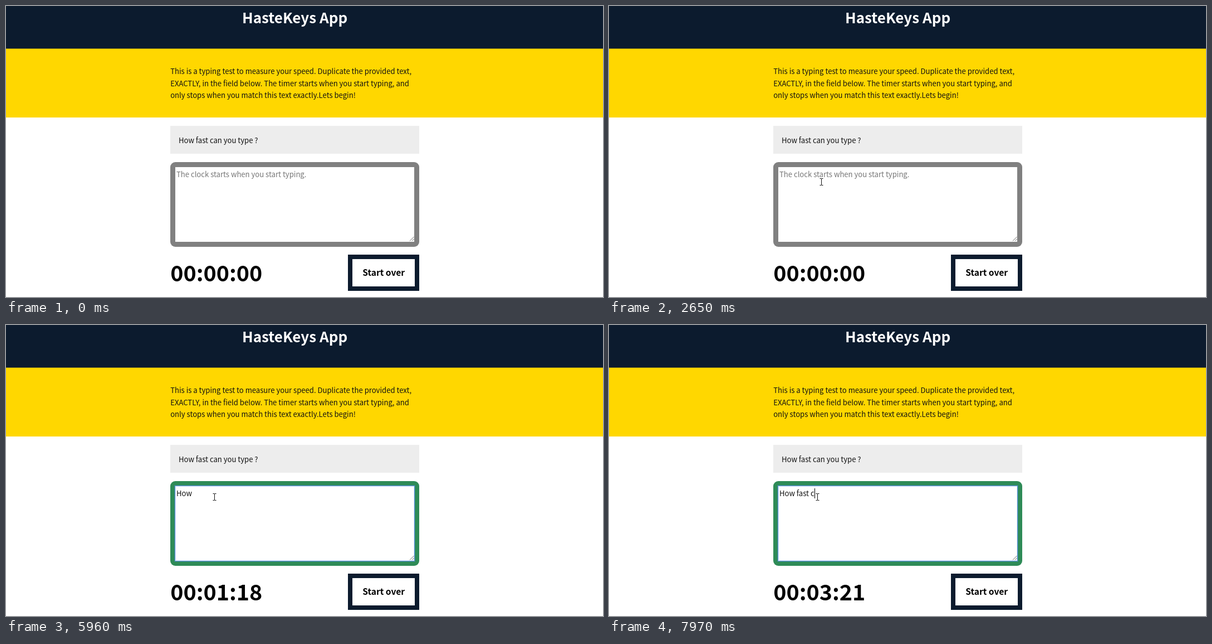
An HTML page for the animation above (8000 ms loop, 1072x522 px).

```html
<!DOCTYPE html>
<html lang="en">
<head>
<meta charset="utf-8">
<title>Typing test</title>
<style>
  html, body { margin: 0; width: 100%; height: 100%; overflow: hidden; background: #fff; }
  svg { display: block; width: 1072px; height: 522px; }
  text { font: 400 13.1px "Source Sans Pro", "Noto Sans CJK SC", "Noto Sans CJK JP", "Noto Sans CJK", "Noto Sans", sans-serif; fill: #111; white-space: pre; }
  .bold { font-weight: 700; fill: #000; }
</style>
</head>
<body>
<svg viewBox="0 0 1072 522">
  <rect width="1072" height="77" fill="#0c1b2e"/>
  <rect y="76.5" width="1072" height="123.5" fill="#ffd700"/>
  <text class="bold" x="518.6" y="31" text-anchor="middle" style="font-size:26px;fill:#fff">HasteKeys App</text>
  <text x="295.2" y="122">This is a typing test to measure your speed. Duplicate the provided text,</text>
  <text x="295.2" y="144">EXACTLY, in the field below. The timer starts when you start typing, and</text>
  <text x="295.2" y="165">only stops when you match this text exactly.Lets begin!</text>

  <rect x="295" y="215" width="447" height="50" fill="#ededed"/>
  <text x="310" y="246">How fast can you type ?</text>

  <rect id="frame" x="295" y="280" width="447" height="152" rx="9"/>
  <rect x="304" y="289" width="429" height="134" fill="#fff"/>
  <g id="ring" fill="none" stroke="#5a90dc">
    <rect x="303.5" y="288.5" width="430" height="135" stroke-width="3" opacity=".2"/>
    <rect x="303.5" y="288.5" width="430" height="135"/>
  </g>
  <path d="M725 421.5l7.5-7.5M729 421.5l3.5-3.5" stroke="#666" fill="none"/>
  <text id="hint" x="306" y="307" style="fill:#757575">The clock starts when you start typing.</text>
  <text id="typed" x="306" y="307"></text>
  <rect id="caret" y="293" width="1" height="18"/>

  <text id="clock" class="bold" x="295.2" y="494" style="font-size:39.4px"></text>
  <rect x="618" y="450" width="120" height="57" fill="#fff" stroke="#0c1b2e" stroke-width="8"/>
  <text class="bold" x="678.2" y="484" text-anchor="middle" style="font-size:15.6px">Start over</text>

  <path id="arrow" d="M.5.5v15.2l3.5-3.3 2.5 5.2 2.1-1-2.4-5h4.6z" fill="#fff" stroke="#000" stroke-width=".9"/>
  <path id="beam" d="M-3-6h2.5l.5.5.5-.5H3M0-5.5v11M-3 6h2.5l.5-.5.5.5H3" fill="none" stroke="#111"/>
</svg>
<script>
const LOOP = 8000, ENTER = 760, FOCUS = 2960, START = 4820;
const MOVE_STEP = 79, TYPE_STEP = 76.8, KEY_GAP = 110, BLINK = 540;

// Pointer stops: time, x, y
const route = [
  [ENTER, 622, 510], [1471, 742, 385], [1550, 855, 347],
  [1780, 870, 337], [2730, 373, 315], [FOCUS, 374.5, 308.5]
];
// Runs of keys, each typed at an even pace
const runs = [[START, 'H'], [5150, 'ow '], [6500, 'fast '], [7820, 'c']];

const $ = id => document.getElementById(id);
const set = (id, name, value) => $(id).setAttribute(name, value);
const show = (id, on) => set(id, 'visibility', on ? 'visible' : 'hidden');
const clamp = (v, lo, hi) => Math.max(lo, Math.min(hi, v));
const smooth = u => u * u * (3 - 2 * u);
const two = n => String(Math.floor(n)).padStart(2, '0');

// Number of screen updates since a moment
const updates = (t, since, step) => Math.floor((t - since + 12) / step);

function pointer(t) {
  const i = clamp(route.findIndex(p => p[0] > t) - 1, 0, route.length - 2);
  const last = t >= FOCUS;
  const [a, b] = last ? route.slice(-2) : route.slice(i, i + 2);
  const u = smooth(clamp((t - a[0]) / (b[0] - a[0]), 0, 1));
  return [1, 2].map(k => a[k] + (b[k] - a[k]) * u);
}

function typing(t) {
  let text = '', last = FOCUS;
  for (const [at, run] of runs) {
    if (t < at) break;
    const n = Math.min(run.length, 1 + Math.floor((t - at) / KEY_GAP));
    text += run.slice(0, n);
    last = at + (n - 1) * KEY_GAP;
  }
  return { text, last };
}

function drawPointer(t) {
  const [x, y] = pointer(ENTER + updates(t, ENTER, MOVE_STEP) * MOVE_STEP);
  const inField = x > 295 && x < 742 && y > 280 && y < 432;
  show('arrow', t >= ENTER && !inField);
  show('beam', t >= ENTER && inField);
  set('arrow', 'transform', `translate(${Math.round(x)} ${Math.round(y)})`);
  set('beam', 'transform', `translate(${Math.floor(x) + .5} ${Math.floor(y) + .5})`);
}

function draw(t) {
  drawPointer(t);

  const started = t >= START, { text, last } = typing(t);
  $('typed').textContent = text;
  show('hint', !started);
  show('ring', t >= FOCUS);
  set('frame', 'fill', started ? '#2e8b57' : '#808080');

  show('caret', t >= FOCUS && Math.floor((t - last) / BLINK) % 2 === 0);
  set('caret', 'x', Math.round(306 + (text && $('typed').getComputedTextLength())));

  // Hundredths of a second
  const c = started ? Math.floor(.87 + 7.81 * updates(t, START, TYPE_STEP)) : 0;
  $('clock').textContent = [c / 6000, c / 100 % 60, c % 100].map(two).join(':');
}

const begin = performance.now();
function tick() {
  draw((performance.now() - begin) % LOOP);
  requestAnimationFrame(tick);
}
tick();
</script>
</body>
</html>
```
